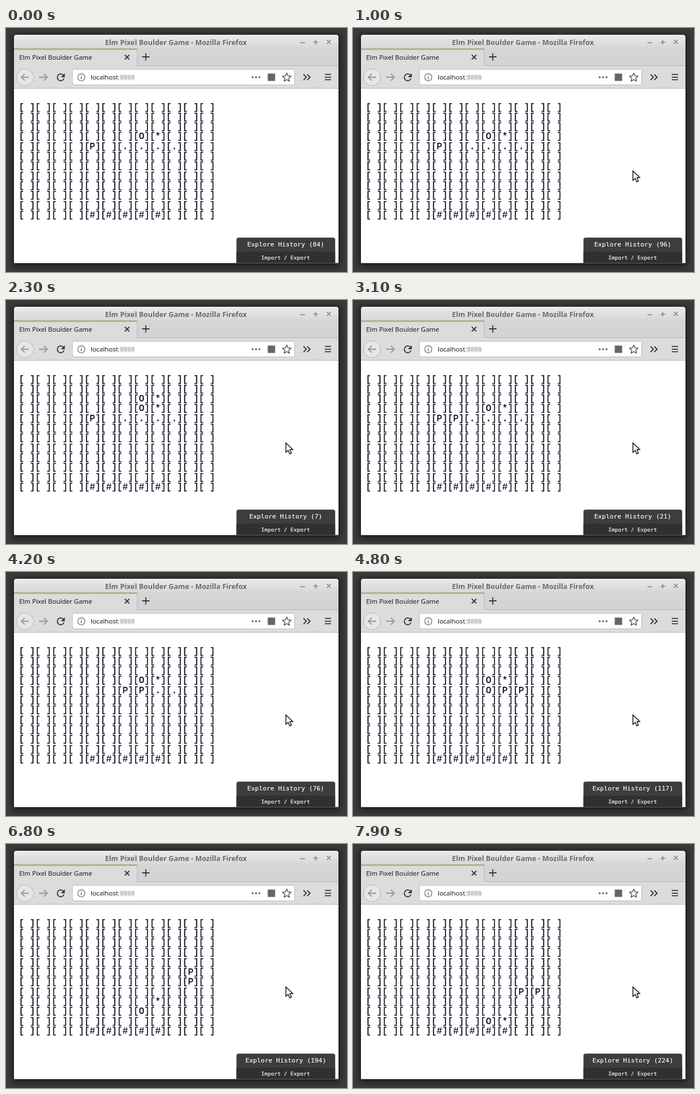
An HTML page that plays this animation: 600 px wide and 431 px high, repeating every 8000 ms.

```html
<!DOCTYPE html>
<html lang="en">
<head>
<meta charset="utf-8">
<title>Boulder game</title>
<style>
html, body { margin: 0; width: 100%; height: 100%; overflow: hidden; background: #3b393a; }
svg { display: block; width: 600px; height: 431px; }
text { white-space: pre; }
.ui { font: 11.45px "Noto Sans", sans-serif; fill: #1c1c1e; }
.title { font: bold 12.5px "Noto Sans", sans-serif; fill: #6b6b6b; text-anchor: middle; }
.page { font: 16px "Liberation Mono", monospace; fill: #08081c; stroke: #08081c; stroke-width: .3; }
.panel { font: 11.25px "DejaVu Sans Mono", monospace; fill: #fff; stroke: #fff; stroke-width: .15; text-anchor: middle; }
.line { fill: none; stroke: #38383a; stroke-width: 1.8; }
</style>
</head>
<body>
<svg viewBox="0 0 600 431">
  <defs>
    <linearGradient id="bar" x2="0" y2="1">
      <stop stop-color="#ebebeb"/><stop offset="1" stop-color="#d5d5d5"/>
    </linearGradient>
    <filter id="blur" x="-10%" y="-10%" width="120%" height="120%"><feGaussianBlur stdDeviation="5"/></filter>
    <clipPath id="tab"><path d="M14 36H231V67H14z"/></clipPath>
  </defs>

  <rect width="600" height="431" fill="#3b393a"/>
  <rect x="12" y="13" width="575" height="406" fill="#141314" filter="url(#blur)"/>
  <path d="M14 415V17q0-5 5-5H580q5 0 5 5V415z" fill="#fff"/>
  <path d="M14 38V17q0-5 5-5H580q5 0 5 5V38z" fill="url(#bar)"/>
  <path d="M14 38H585V67H14z" fill="#d4d4d5"/>
  <path d="M14 67H585V106H14z" fill="#dcdcdc"/>
  <path d="M14 36H231V67H14z" fill="#dcdcdc"/>
  <path d="M14 37.2H231" stroke="#9ab47c" stroke-width="2.4"/>
  <path d="M231 38V66.5H585M14 106.5H585" fill="none" stroke="#b4b4b4"/>
  <g clip-path="url(#tab)"><circle id="burst" cx="28" cy="52" fill="#5f95d8"/></g>

  <text class="title" x="299" y="29.5">Elm Pixel Boulder Game - Mozilla Firefox</text>
  <path d="M518 26h8M541 25h8M545 21v8M564.5 21l7 7M571.5 21l-7 7" stroke="#858585" stroke-width="1.6"/>
  <text class="ui" x="23" y="55.7">Elm Pixel Boulder Game</text>
  <path class="line" d="M209 47.500l8 8M217 47.500l-8 8M239.500 51h13M246 44.500v13"/>

  <circle cx="33.500" cy="87" r="15" fill="#e6e6e6" stroke="#b5b5b5"/>
  <path class="line" style="stroke:#98989a" d="M40 87H27.500M33 81l-6 6 6 6M58 87H72M66.500 81l6 6-6 6"/>
  <path class="line" d="M101 83.500A6 6 0 1 0 102 89"/>
  <path d="M103.500 80v7h-7z" fill="#38383a"/>
  <rect x="117" y="73" width="391" height="27.500" rx="2.500" fill="#fff" stroke="#b8b8b8"/>
  <circle cx="132.500" cy="87" r="6.300" class="line" style="stroke:#727272;stroke-width:1.200"/>
  <path d="M132.500 86v4.500M132.500 83v1.600" stroke="#727272" stroke-width="1.500"/>
  <text class="ui" x="149" y="91">localhost<tspan fill="#85858a">:8888</tspan></text>
  <g fill="#666">
    <circle cx="434" cy="87" r="1.800"/><circle cx="440" cy="87" r="1.800"/><circle cx="446" cy="87" r="1.800"/>
    <rect x="460.500" y="80.500" width="13" height="13"/>
  </g>
  <path class="line" style="stroke:#5c5c5e;stroke-width:1.500" stroke-linejoin="round" d="M494 79.500l2.200 5 5.300.6-4 3.600 1.200 5.300-4.700-2.800-4.700 2.800 1.200-5.300-4-3.600 5.300-.6z"/>
  <path class="line" d="M523.500 82l5 5-5 5M530 82l5 5-5 5M561 82.200h11M561 86.800h11M561 91.400h11"/>

  <g id="rows" class="page"></g>

  <path d="M405.500 415V374.300q0-4 4-4H575.200q4 0 4 4V415z" fill="#3d3c3e"/>
  <path d="M405.500 395H579.200V415H405.500z" fill="#303031"/>
  <text id="history" class="panel" x="492.300" y="386.400"></text>
  <text class="panel" x="492" y="408.800" style="font-size:9.55px">Import / Export</text>
  <path d="M14 415.500H585" stroke="#8a8a8a" stroke-opacity=".6"/>
  <path id="cursor" d="M0 0V16.500L4 13 6.800 19.200 9.800 17.800 7 11.800H12z" fill="#fff" stroke="#1b1b1b" stroke-width="1.500"/>
</svg>

<script>
const LOOP = 8000, STEP = 100, SIZE = 12;
const $ = id => document.getElementById(id);

// Each track is a list of [time, value], linear in between.
const playerX = [[2950, 4], [3300, 5], [3675, 5], [5425, 10], [7725, 10], [8075, 9]];
const playerY = [[6000, 4], [6350, 5], [6500, 5], [7200, 7]];
const drop = [[1799, 3], [1800, 1], [2500, 3]];
const boulderY = [...drop, [4725, 3], [7175, 10]];
const diamondY = [...drop, [5075, 3], [7525, 10]];
const count = [[0, 84], [1000, 96], [1799, 105], [1800, 1], [2950, 16], [3100, 21], [3500, 27],
  [4200, 76], [5425, 160], [5600, 162], [6500, 173], [7100, 215], [7900, 224]];

function at(track, t) {
  const i = track.findIndex(p => p[0] >= t);
  if (i < 0) return track[track.length - 1][1];
  if (i === 0) return track[0][1];
  const [t0, a] = track[i - 1], [t1, b] = track[i];
  return a + (b - a) * (t - t0) / (t1 - t0);
}
const quarter = (track, t) => Math.round(at(track, t) * 4) / 4;

const rows = Array.from({ length: SIZE }, (_, r) => {
  const row = document.createElementNS("http://www.w3.org/2000/svg", "text");
  row.setAttribute("x", 22.5);
  row.setAttribute("y", 144.5 + 17.3 * r);
  return $("rows").appendChild(row);
});

function drawGrid(t) {
  const grid = rows.map(() => Array(SIZE).fill(" "));
  // A thing between two cells shows in both.
  const put = (ch, x, y) => {
    grid[Math.floor(y)][Math.floor(x)] = ch;
    grid[Math.ceil(y)][Math.ceil(x)] = ch;
  };
  const px = quarter(playerX, t);
  const reach = t < 7000 ? Math.ceil(px) : SIZE;
  for (let x = 4; x <= 8; x++) put("#", x, 11);
  for (let x = Math.max(6, reach + 1); x <= 9; x++) put(".", x, 4);
  put("O", 7, quarter(boulderY, t));
  put("*", 8, quarter(diamondY, t));
  put("P", px, quarter(playerY, t));
  rows.forEach((row, r) => row.textContent = grid[r].map(c => `[${c}]`).join(""));
}

function draw(t) {
  drawGrid(t);
  $("history").textContent = `Explore History (${Math.floor(at(count, t) + 1e-6)})`;

  const k = (t - 1700) / 350;
  const on = k > 0 && k < 1;
  $("burst").setAttribute("r", on ? 311 * k : 0);
  $("burst").setAttribute("opacity", on ? 0.46 * (1 - k * k) : 0);

  const m = 1 - Math.min(1, Math.max(0, (t - 200) / 500));
  $("cursor").setAttribute("transform", `translate(${492.5 + 80 * m * m} ${252.5 + 70 * m * m})`);
  $("cursor").setAttribute("visibility", t < 200 ? "hidden" : "visible");
}

const start = performance.now();
function frame() {
  const t = (performance.now() - start) % LOOP;
  draw(Math.floor(t / STEP) * STEP);
  requestAnimationFrame(frame);
}
frame();
</script>
</body>
</html>
```
